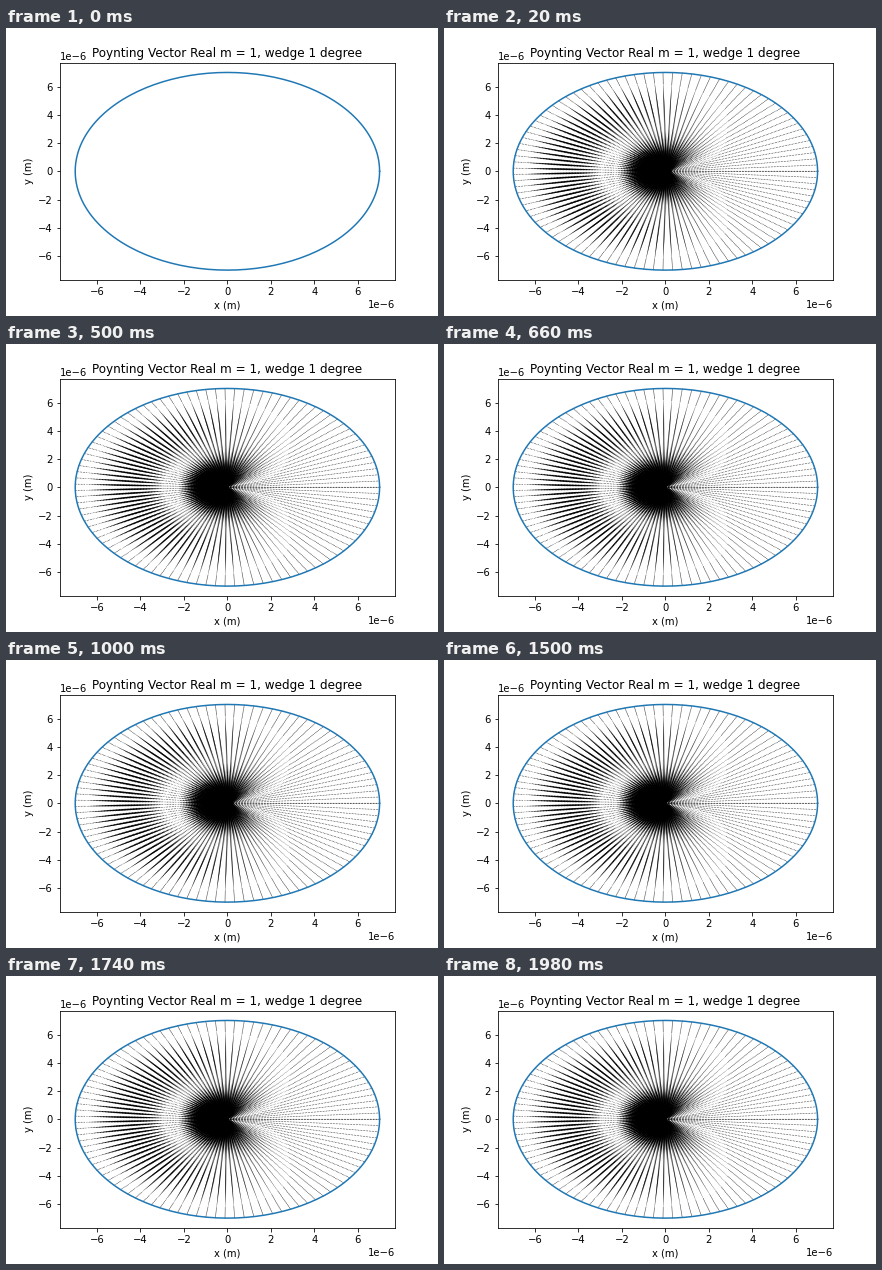
A matplotlib script that plays this animation: 432 px wide and 288 px high, repeating every 2000 ms.

```python
import numpy as np
import matplotlib.pyplot as plt
from matplotlib.animation import FuncAnimation

FRAMES = 100
INTERVAL = 20          # ms
RADIUS = 7e-6          # m
SAMPLES = 100          # per polar direction


def energy_flow(r, phi):
    """Cartesian gradient of E^2 for E ~ J_1/2(kr) sin(phi/2)."""
    x = np.pi * r / RADIUS
    s, c = np.sin(phi / 2), np.cos(phi / 2)
    envelope = (np.sin(x) / x) ** 2
    radial = (np.sin(2 * x) / x - envelope) * s**2
    angular = envelope * s * c
    u = radial * np.cos(phi) - angular * np.sin(phi)
    v = radial * np.sin(phi) + angular * np.cos(phi)
    return u, v


fig = plt.figure(figsize=(6, 4), dpi=72, facecolor="white")
fig.subplots_adjust(left=0.125, right=0.9, bottom=0.125, top=0.88)
ax = fig.add_subplot()

angle = np.linspace(0, 2 * np.pi, 201)
ax.plot(RADIUS * np.cos(angle), RADIUS * np.sin(angle), color="#1f77b4", lw=1.5)
ax.set_xlim(-1.1 * RADIUS, 1.1 * RADIUS)
ax.set_ylim(-1.1 * RADIUS, 1.1 * RADIUS)
ax.set_title("Poynting Vector Real m = 1, wedge 1 degree", y=1.0)
ax.set_xlabel("x (m)")
ax.set_ylabel("y (m)")

r, phi = np.meshgrid(
    np.linspace(1e-12, RADIUS, SAMPLES), np.linspace(0, 2 * np.pi, SAMPLES)
)
u, v = energy_flow(r, phi)
arrows = ax.quiver(r * np.cos(phi), r * np.sin(phi), u, v, color="black", zorder=1)


def update(i):
    # The flow reverses every quarter loop; its length is normalised.
    sign = -1 if (i // (FRAMES // 4)) % 2 == 0 else 1
    arrows.set_UVC(sign * u, sign * v)
    arrows.set_visible(i > 0)
    return (arrows,)


anim = FuncAnimation(
    fig, update, frames=FRAMES, interval=INTERVAL, repeat=True, repeat_delay=0
)
plt.show()
```
